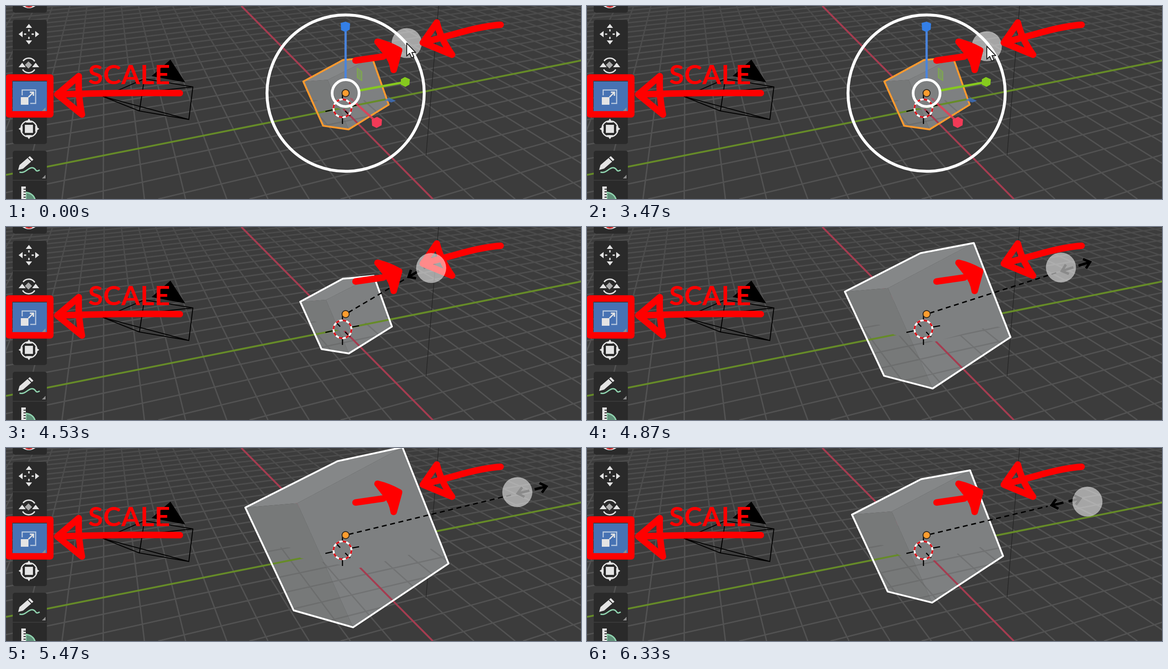
An HTML page for the animation above (6.39 s loop, 1280 px wide and 432 px high).

```html
<!DOCTYPE html>
<html lang="en">
<head>
<meta charset="utf-8">
<title>Scale tool</title>
<style>
  html, body { margin: 0; height: 100%; overflow: hidden; background: #3c3c3c; }
  svg { display: block; width: 100vw; height: 100vh; }
  .line { fill: none; }
  .red { fill: none; stroke: #f00; stroke-width: 14.5; stroke-linecap: round; stroke-linejoin: round; }
  .icon { fill: #e4e4e4; }
  .pen { fill: none; stroke: #e4e4e4; stroke-width: 3; }
  text { font: 700 60px Lato, sans-serif; letter-spacing: .6px; fill: #f00; }
</style>
</head>
<body>
<svg viewBox="0 0 1280 432">
  <defs>
    <linearGradient id="fade" gradientUnits="userSpaceOnUse" x1="0" y1="0" x2="0" y2="200">
      <stop stop-color="#4a4a4a"/><stop offset="1" stop-color="#525252"/>
    </linearGradient>
    <clipPath id="hullClip"><path id="hull"/></clipPath>
    <clipPath id="cutClip"><path id="cut"/></clipPath>
    <path id="tri" d="M0-23 7-14H-7Z"/>
  </defs>

  <rect width="1280" height="432" fill="#3c3c3c"/>
  <path id="grid" class="line" stroke="url(#fade)" stroke-width="3"/>
  <path d="M963 0 935 335" stroke="#272727" stroke-width="1.5"/>
  <g id="axes" stroke-width="4">
    <path d="M0 378 1280 122" stroke="#668b28"/>
    <path d="M524 0 950 432" stroke="#a53c50"/>
  </g>

  <!-- camera -->
  <path d="M366 120 399 171 324 157Z"/>
  <path class="line" stroke="#000" stroke-width="2" d="M308 163 416 181 407 254 297 235Z M308 163 217 203 297 235 M416 181 217 203 407 254"/>

  <!-- cube, with the part of the floor that lies in front of it -->
  <path id="top" fill="#858788"/>
  <path id="left" fill="#777979"/>
  <path id="front" fill="#7e8081"/>
  <g clip-path="url(#hullClip)"><g clip-path="url(#cutClip)">
    <use href="#grid" opacity=".3"/><use href="#axes"/>
  </g></g>
  <path id="edge" class="line" stroke-width="4" stroke-linejoin="round"/>

  <!-- 3D cursor -->
  <path class="line" stroke="#000" stroke-width="2.5" d="M711 236 729 232 M769 224 786 221 M749 193V211 M749 246V264 M734 213 744 223 M755 235 766 246"/>
  <circle cx="749" cy="229" r="20" class="line" stroke="#fff" stroke-width="4"/>
  <circle cx="749" cy="229" r="20" class="line" stroke="#d8141c" stroke-width="4" stroke-dasharray="7.85"/>

  <g id="gizmo">
    <path d="M782 139 792 147V167L782 160Z" fill="#7cb342" fill-opacity=".4" stroke="#7fb044" stroke-width="1.5"/>
    <path d="M843 211 852 205 868 212 858 216Z" fill="#3d6fc0" opacity=".8"/>
    <path d="M765 205 772 207 776 214 769 212Z" fill="#c84058" opacity=".6"/>
    <g stroke-width="5">
      <path d="M756 164V54" stroke="#4a84dc"/>
      <path d="M787 189 884 171" stroke="#86c81f"/>
      <path d="M777 216 822 257" stroke="#e83c56" opacity=".85"/>
    </g>
    <path d="M745 38 756 35 766 39 765 53 755 58 746 54Z" fill="#347fe6"/>
    <path d="M879 164 888 159 899 164 898 176 889 181 879 176Z" fill="#85ca1e"/>
    <path d="M814 254 826 248 837 254 836 267 825 273 815 268Z" fill="#f33a57"/>
    <circle cx="756" cy="195" r="175" class="line" stroke="#fff" stroke-width="6.5"/>
    <circle cx="756" cy="195" r="30" class="line" stroke="#fff" stroke-width="6"/>
  </g>
  <g id="drag" stroke="#000">
    <path id="dash" stroke-width="3" stroke-dasharray="11 8" stroke-dashoffset="-7"/>
    <path id="arrows" class="line" stroke-width="5.5" d="M-34 0H-6 M-20-11-33 0-20 11 M6 0H34 M20-11 33 0 20 11"/>
  </g>
  <circle cx="756" cy="195" r="8" fill="#ff9d2e" stroke="#30271c" stroke-width="2"/>

  <!-- toolbar -->
  <g fill="#2a2a2a">
    <rect x="15" y="-20" width="76" height="35" rx="5"/>
    <rect x="15" y="31" width="76" height="278" rx="5"/>
    <rect x="15" y="324" width="76" height="140" rx="5"/>
  </g>
  <path stroke="#3a3a3a" stroke-width="2" d="M15 98H91M15 168H91M15 238H91M15 390H91"/>
  <rect x="15" y="169" width="76" height="67" fill="#4772b3"/>
  <path d="M36-2Q51 9 66-2" class="line" stroke="#e4e4e4" stroke-width="3"/>
  <path d="M44 0Q51 5 58 0" class="line" stroke="#d33" stroke-width="3"/>
  <g id="move" class="icon" transform="translate(51 63)"></g>
  <path class="pen" d="M51 52V57M51 69V74M40 63H45M57 63H62"/>
  <g class="icon">
    <path d="M50 124 58 132 50 140 42 132Z" fill="#aaa"/>
    <path d="M28 137H44L36 127Z M58 137H74L66 127Z"/>
    <rect x="33" y="204" width="17" height="17"/>
    <rect x="42" y="266" width="18" height="18"/>
  </g>
  <path class="pen" d="M38 123A16 16 0 0 1 64 124M64 142A16 16 0 0 1 37 142"/>
  <path class="line" stroke="#b9c9df" stroke-width="2.5" d="M36 200V188H66V218H54"/>
  <path class="pen" d="M50 204 60 194M53 193H61V201"/>
  <circle class="pen" cx="51" cy="275" r="18" stroke-dasharray="20 8.27" stroke-dashoffset="-4"/>
  <g id="turn" class="icon" transform="translate(51 275)"></g>
  <path d="M27 367 30 356 53 336 61 344 38 364Z" class="icon"/>
  <path d="M49 340 57 348" stroke="#2a2a2a" stroke-width="2"/>
  <path d="M30 372C44 375 48 362 58 362S64 374 75 367" class="line" stroke="#8fd3ae" stroke-width="3"/>
  <path d="M88 378V386H80Z M88 227V235H80Z" fill="#8f8f8f"/>
  <path d="M44 417Q61 419 65 434H44Z" fill="#5f8f78" stroke="#8fd3ae" stroke-width="3"/>
  <path d="M34 404H44V432H34Z" class="icon"/>
  <path d="M39 410H44M39 416H44M39 422H44M39 428H44" stroke="#2a2a2a" stroke-width="2"/>

  <g id="touchLow"></g>
  <!-- hand-drawn notes -->
  <rect class="red" x="6.500" y="160" width="92" height="82.500"/>
  <path class="red" d="M387 195Q250 193 114 198L162 157Q160 200 169 243L114 198"/>
  <path class="red" d="M1101 42Q1060 45 1005 61L928 82 959 37Q968 75 993 109L928 82"/>
  <path class="red" d="M778 122 840 113"/>
  <path class="red" style="fill:#f00" d="M827 80Q852 86 875 99L863 143Q860 121 846 104Z"/>
  <text x="183" y="175">SCALE</text>
  <g id="touchHigh"></g>

  <circle id="touch" r="33.500" fill="#fff" opacity=".54"/>
  <path id="pointer" d="M0 0V29L6.500 23 11 33 16 31 11.500 21H20Z" fill="#fff" stroke="#222" stroke-width="2" stroke-linejoin="round"/>
</svg>

<script>
const $ = id => document.getElementById(id);
const LOOP = 6390, MOVE = 3470, GRAB = 4195, STEP = 1000 / 15, LAG = 95;
const PIVOT = [756, 195];

// Floor lines run from each vanishing point to evenly spaced points on the bottom row.
function fan(vx, start, gap, from, to) {
  let d = '';
  for (let i = from; i <= to; i++) if (i) d += `M${vx} -308L${start + gap * i} 432`;
  return d;
}
$('grid').setAttribute('d', fan(220, 950, 91.7, -15, 20) + fan(3430, -270, 203, -25, 8));

for (const id of ['move', 'turn'])
  $(id).innerHTML = [0, 90, 180, 270].map(a => `<use href="#tri" transform="rotate(${a})"/>`).join('');

// Touch position: time, x, y
const keys = [
  [3470, 890, 90], [3800, 890, 94], [4100, 912, 103], [4200, 914, 104],
  [4530, 944, 92], [4730, 1088, 88], [4950, 1034, 92], [5130, 1078, 90],
  [5400, 1167, 95], [5800, 900, 121], [5900, 890, 123], [6330, 1114, 120]
];

function hand(t) {
  const last = keys.length - 1;
  let i = 0;
  while (i < last - 1 && t > keys[i + 1][0]) i++;
  const a = keys[i], b = keys[i + 1], span = b[0] - a[0];
  const u = Math.max(0, Math.min(1, (t - a[0]) / span));
  const slope = (n, c) => {
    const p = keys[Math.max(0, n - 1)], q = keys[Math.min(last, n + 1)];
    return (q[c] - p[c]) / (q[0] - p[0]) * span;
  };
  return [1, 2].map(c =>
    a[c] * (1 + 2 * u) * (1 - u) ** 2 + slope(i, c) * u * (1 - u) ** 2 +
    b[c] * u * u * (3 - 2 * u) - slope(i + 1, c) * u * u * (1 - u));
}

// Outline corners clockwise, then the near corner, at a small and a large scale
const small = [[658, 168], [750, 118], [817, 112], [856, 222], [763, 280], [704, 271], [714, 164]];
const large = [[593, 150], [744, 72], [851, 53], [923, 241], [768, 343], [671, 319], [680, 143]];
const cutSmall = [[650, 208], [690, 211], [741, 231], [752, 232], [772, 222], [865, 190]];
const cutLarge = [[590, 215], [660, 217], [697, 239], [770, 251], [873, 221], [935, 222]];

const mix = (a, b, k) => a.map((p, i) => p.map((v, j) => v + (b[i][j] - v) * k));
const poly = pts => 'M' + pts.join('L') + 'Z';

function drawCube(k, color) {
  const v = mix(small, large, k);
  const face = (id, corners) => $(id).setAttribute('d', poly(corners.map(i => v[i])));
  face('top', [0, 1, 2, 6]);
  face('left', [0, 6, 4, 5]);
  face('front', [6, 2, 3, 4]);
  face('hull', [0, 1, 2, 3, 4, 5]);
  face('edge', [0, 1, 2, 3, 4, 5]);
  $('edge').setAttribute('stroke', color);
  $('cut').setAttribute('d', poly([...mix(cutSmall, cutLarge, k), [1100, 500], [400, 500]]));
}

function drawHandle([x, y]) {
  const dx = x - PIVOT[0], dy = y - PIVOT[1], dist = Math.hypot(dx, dy);
  const end = 1 - 42 / dist;
  $('dash').setAttribute('d', `M${PIVOT}L${PIVOT[0] + dx * end} ${PIVOT[1] + dy * end}`);
  $('arrows').setAttribute('transform', `translate(${x} ${y}) rotate(${Math.atan2(dy, dx) * 180 / Math.PI})`);
  return dist;
}

function draw(now) {
  const t = now % LOOP;
  const time = MOVE + Math.floor((t - MOVE + 7) / STEP) * STEP;
  const held = time >= GRAB;
  const [x, y] = t < MOVE ? [892, 83] : hand(time);
  const at = `translate(${x} ${y})`;
  const dist = drawHandle(hand(time - LAG));

  drawCube(held ? (dist - 190) / 123 : -0.06, held ? '#fff' : '#ff9a2e');
  $('gizmo').style.display = $('pointer').style.display = held ? 'none' : '';
  $('drag').style.display = held ? '' : 'none';
  $(held ? 'touchHigh' : 'touchLow').append($('touch'));
  $('touch').setAttribute('transform', at);
  $('pointer').setAttribute('transform', at);
  requestAnimationFrame(frame);
}

const start = performance.now();
const frame = () => draw(performance.now() - start);
frame();
</script>
</body>
</html>
```
